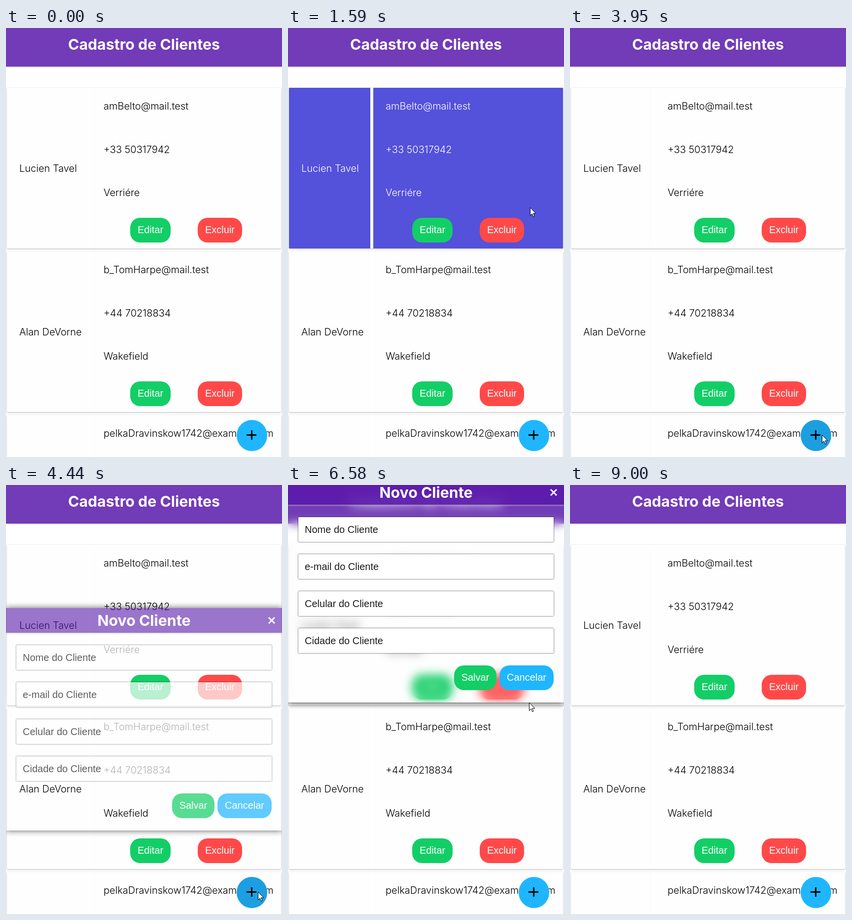
Write an HTML page that moves like this. It is 560x868 px and loops after 9950 ms.

```html
<!DOCTYPE html>
<html lang="pt-BR">
<head>
<meta charset="utf-8">
<title>Cadastro de Clientes</title>
<style>
  :root { --blue: #1fb6ff; --green: #13ce66; --red: #ff4949; --purple: rgba(90, 25, 171, .85); }
  html, body { margin: 0; width: 100%; height: 100%; overflow: hidden; background: #fff; }
  #stage {
    position: relative; width: 560px; height: 868px; overflow: hidden; background: #fff;
    font: 300 20px/30px Inter, sans-serif; font-optical-sizing: none; color: #000;
  }
  #stage * { position: absolute; box-sizing: border-box; white-space: nowrap; }
  .bar { left: 0; width: 560px; background: var(--purple); box-shadow: 0 1px 3px #bbb; }
  .bar b { left: 0; width: 100%; text-align: center; color: #fff; font-weight: 700; font-size: 30.3px; line-height: 40px; }
  .row {
    --h: 0%; left: 2px; width: 556px; height: 325px; background: #fefefe;
    box-shadow: 0 1px 3px rgba(0, 0, 0, .3); color: color-mix(in srgb, #fff var(--h), #000);
  }
  .cell { top: 0; height: 100%; background: color-mix(in srgb, #5451db var(--h), #fefefe); }
  .gap { left: 165px; width: 6px; height: 100%; background: #fff; }
  .btn {
    height: 50px; border-radius: 20px; color: #fff; text-align: center;
    font: 400 20px/49px "Liberation Sans", Arial, sans-serif;
  }
  #add {
    --h: 0%; left: 467.5px; top: 793px; width: 62.5px; height: 62.5px; border-radius: 50%;
    background: color-mix(in srgb, #1c9fe1 var(--h), var(--blue));
  }
  #add i { background: #000; }
  #modal { left: 0; top: 0; width: 560px; height: 450px; box-shadow: 0 0 12px rgba(0, 0, 0, .9); }
  .field {
    left: 21px; width: 518px; height: 50px; padding-left: 13px; border-radius: 1px;
    background: #fff; box-shadow: 0 0 2.5px #000; color: #1c1c1c;
    font: 400 20px/50px "Liberation Sans", Arial, sans-serif;
  }
  #cancel { --h: 0%; background: color-mix(in srgb, #1587c6 var(--h), var(--blue)); }
  #cursor { left: 0; top: 0; }
</style>
</head>
<body>
<div id="stage">
  <div class="bar" style="top:0;height:78px"><b style="top:13px">Cadastro de Clientes</b></div>
  <div id="add">
    <i style="left:20.5px;top:29px;width:20px;height:3px"></i>
    <i style="left:29.5px;top:21px;width:3px;height:19px"></i>
  </div>
  <div id="modal">
    <div class="bar" style="top:0;height:50px"><b style="top:5px">Novo Cliente</b></div>
    <svg style="left:531px;top:17px" width="16" height="16"><path d="M2 2 14 14M14 2 2 14" stroke="#fff" stroke-width="3"/></svg>
    <div class="btn" style="left:337px;top:375px;width:86px;background:var(--green)">Salvar</div>
    <div class="btn" id="cancel" style="left:429px;top:375px;width:110px">Cancelar</div>
  </div>
  <svg id="cursor" width="14" height="21"><path d="M.5.5v16l3.7-3.6 2.5 5.9 2.4-1-2.5-5.8h5.2z" fill="#fff" stroke="#000"/></svg>
</div>
<script>
const LOOP = 9950;
const $ = id => document.getElementById(id);
const stage = $('stage'), add = $('add'), modal = $('modal'), cancel = $('cancel'), cursor = $('cursor');

function box(parent, className, text, style, before = null) {
  const el = document.createElement('div');
  el.className = className;
  el.textContent = text;
  el.style.cssText = style;
  return parent.insertBefore(el, before);
}

const clients = [
  ['Lucien Tavel', 'amBelto@mail.test', '+33 50317942', 'Verriére'],
  ['Alan DeVorne', 'b_TomHarpe@mail.test', '+44 70218834', 'Wakefield'],
  ['', 'pelkaDravinskow1742@example.com', '', '']
];
const rows = clients.map(([name, ...details], i) => {
  const row = box(stage, 'row', '', `top:${121 + 331 * i}px`, add);
  box(row, 'cell', '', 'left:0;width:165px');
  box(row, 'gap', '', '');
  box(row, 'cell', '', 'left:171px;width:385px');
  box(row, '', name, 'left:25px;top:148px');
  details.forEach((text, k) => box(row, '', text, `left:196px;top:${22 + 87.5 * k}px`));
  box(row, 'btn', 'Editar', 'left:250px;top:263px;width:82px;background:var(--green)');
  box(row, 'btn', 'Excluir', 'left:387px;top:263px;width:90px;background:var(--red)');
  return row;
});
['Nome', 'e-mail', 'Celular', 'Cidade'].forEach((label, i) =>
  box(modal, 'field', label + ' do Cliente', `top:${75 + 75 * i}px`));

// Bursts of screen updates, one every 70 ms; the picture rests in between.
const bursts = [[0, 0], [330, 400], [860, 1180], [1380, 2360], [2420, 2770], [2990, 3550], [3950, 4930],
  [5000, 5140], [5410, 5680], [5880, 6870], [6940, 7710], [7980, 7980], [8180, 9000]];
function sampled(t) {
  const [from, to] = bursts.findLast(b => b[0] <= t);
  return t >= to ? to : from + Math.floor((t - from) / 70) * 70;
}

const path = [[860, 548, 250], [1180, 488, 336], [1380, 488, 336], [1590, 491, 363], [1900, 503, 480],
  [2360, 526, 740], [2420, 529, 784], [2630, 533, 790], [2990, 533, 790], [3270, 516, 816], [3550, 511, 823],
  [5410, 511, 823], [5680, 507, 814], [5880, 507, 814], [6580, 489, 440], [6870, 484, 417],
  [7710, 486, 396], [7980, 486, 396]];
function cursorAt(t) {
  const i = path.findIndex(p => p[0] > t);
  if (i < 1) return null;
  const [a, b] = [path[i - 1], path[i]];
  const k = (t - a[0]) / (b[0] - a[0]);
  return [1, 2].map(n => a[n] + (b[n] - a[n]) * k);
}

const clamp = v => Math.min(1, Math.max(0, v));
const bezier = (a, b, u) => 3 * a * u * (1 - u) ** 2 + 3 * b * u * u * (1 - u) + u ** 3;
function ease(x) {
  if (x <= 0 || x >= 1) return clamp(x);
  let lo = 0, hi = 1;
  for (let i = 0; i < 24; i++) {
    const mid = (lo + hi) / 2;
    if (bezier(.25, .25, mid) < x) lo = mid; else hi = mid;
  }
  return bezier(.1, 1, lo);
}

const hovers = [
  [rows[0], 860, 1760], [rows[1], 1760, 2370], [rows[2], 2370, 3100],
  [add, 3100, 4600], [cancel, 6900, 9000]
];
const FADE = 200;

function draw(time) {
  const t = sampled(time % LOOP);
  for (const [el, on, off] of hovers) {
    const level = clamp((t - on) / FADE) - clamp((t - off) / FADE);
    el.style.setProperty('--h', level * 100 + '%');
  }

  const open = t >= 9000 ? 0 : ease((t - 3948) / 1190) - ease((t - 8152) / 900);
  modal.style.visibility = open > 0 ? 'visible' : 'hidden';
  modal.style.opacity = open;
  modal.style.transform = `translateY(${Math.round(858 - 868 * open)}px)`;
  modal.style.backdropFilter = open === 1 ? 'blur(10px)' : 'none';

  const point = cursorAt(t);
  cursor.style.visibility = point ? 'visible' : 'hidden';
  if (point) cursor.style.transform = `translate(${point.map(v => Math.round(v) + 'px')})`;
}

const start = performance.now();
function tick() {
  draw(performance.now() - start);
  requestAnimationFrame(tick);
}
tick();
</script>
</body>
</html>
```
